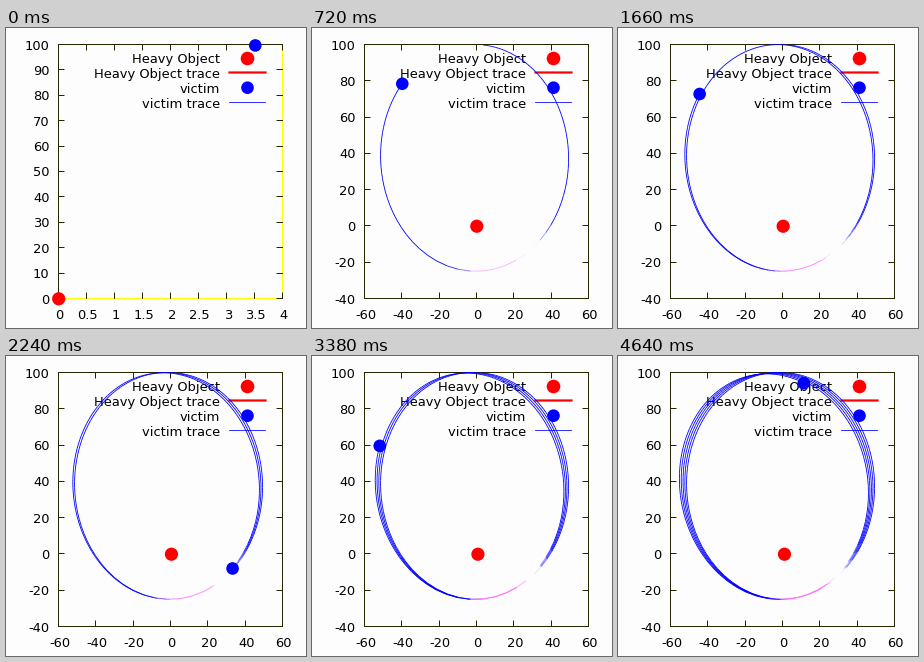
A matplotlib script that plays this animation: 300x300 px, repeating every 4.66 s.

```python
import math

import numpy as np
import matplotlib.pyplot as plt
from matplotlib.animation import FuncAnimation
from matplotlib.collections import LineCollection
from matplotlib.patches import Circle

SIZE, DPI = 300, 100
PX = 72 / DPI                      # one pixel in points
LEFT, RIGHT, TOP, BOTTOM = 52.5, 276.5, 16.5, 270.5
TICK = 5.5
FONT = dict(family="DejaVu Sans", fontsize=13 * PX, va="baseline")
INK = "#262600"

# Slowly turning Kepler ellipse, with the heavy body in one focus
A, ECC, PERIOD = 62.5, 0.6, 58.15
B, FOCUS = A * math.sqrt(1 - ECC ** 2), A * ECC
TILT, TURN = 0.0153, 0.029         # first tilt, extra tilt per orbit
DRIFT = 0.0035                     # heavy body's x speed per step

fig = plt.figure(figsize=(SIZE / DPI, SIZE / DPI), dpi=DPI, facecolor="#fdfdfe")
ax = fig.add_axes([0, 0, 1, 1])


def orbit(step):
    """Victim's x, y and phase (from the far point) at the given steps."""
    mean = 2 * np.pi * (step + 0.5) / PERIOD
    phase = mean - ECC * np.sin(mean)
    for _ in range(20):
        phase = phase - (phase + ECC * np.sin(phase) - mean) / (1 + ECC * np.cos(phase))
    x, y = B * np.sin(phase), FOCUS + A * np.cos(phase)
    lag = np.arctan2(x, y) - phase
    swept = phase + (lag + np.pi) % (2 * np.pi) - np.pi
    tilt = TILT + TURN * swept / (2 * np.pi)
    c, s = np.cos(tilt), np.sin(tilt)
    return x * c - y * s + DRIFT * step, x * s + y * c, phase


def axis_range(lo, hi):
    """Round limits outward to a tidy tick step."""
    span = hi - lo
    power = 10 ** math.floor(math.log10(span))
    room = 20 * power / span
    for limit, unit in ((10, 0.2), (4, 0.5), (1, 1)):
        if room > limit:
            break
    unit *= power
    return math.floor(lo / unit) * unit, math.ceil(hi / unit) * unit, unit


def ticks(lo, hi, unit):
    return [lo + k * unit for k in range(round((hi - lo) / unit) + 1)]


def label(x, y, text, ha):
    ax.text(x, y, text, ha=ha, color="black", zorder=2, **FONT)


def dot(x, y, r, color, z):
    ax.add_patch(Circle((x, y), r, fc=color, ec="none", zorder=z))


def line(xs, ys, color, width=1, z=3):
    """Line on exact pixel centres, without snapping."""
    ax.plot(xs, ys, color=color, lw=width * PX, snap=False, zorder=z,
            solid_capstyle="projecting", solid_joinstyle="miter")


def draw_frame(xr, yr, to_x, to_y, first):
    far = "#ffff00" if first else INK
    line([LEFT, RIGHT, RIGHT], [BOTTOM, BOTTOM, TOP], far, z=1)
    line([LEFT, LEFT, RIGHT], [BOTTOM, TOP, TOP], INK, z=1)
    for v in ticks(*xr):
        x = math.floor(to_x(v)) + 0.5
        line([x, x], [BOTTOM, BOTTOM - TICK], INK, z=1)
        line([x, x], [TOP, TOP + TICK], INK, z=1)
        label(to_x(v) + 1.2, 291, f"{round(v, 6) + 0:g}", "center")
    for v in ticks(*yr):
        y = math.floor(to_y(v)) + 0.5
        line([LEFT, LEFT + TICK], [y, y], INK, z=1)
        line([RIGHT, RIGHT - TICK], [y, y], INK, z=1)
        label(43.6, to_y(v) + 5, f"{round(v, 6) + 0:g}", "right")


def draw_key():
    names = "Heavy Object", "Heavy Object trace", "victim", "victim trace"
    for i, name in enumerate(names):
        label(214, 35.2 + 14.9 * i, name, "right")
    dot(241.5, 30.5, 6.8, "red", 3)
    line([223.5, 259.5], [44.5, 44.5], "red", 2.2)
    dot(241.5, 59.7, 6.3, "blue", 3)
    line([223.5, 259.5], [74.5, 74.5], "blue", 0.8)


def draw_trace(x, y, phase):
    """Blue line that fades out low on the right and is pink at the bottom."""
    deg = np.degrees(phase[:-1]) % 360
    pink = np.interp(deg, [146, 150, 178, 188], [0, 1, 1, 0])
    alpha = np.interp(deg, [122, 138, 148, 154, 178, 200], [1, 0, 0, 0.5, 0.5, 1])
    rgba = np.column_stack([pink, 0.4 * pink, np.ones_like(deg), alpha])
    pts = np.column_stack([x, y])
    segs = np.stack([pts[:-1], pts[1:]], axis=1)
    ax.add_collection(LineCollection(segs, colors=rgba, linewidths=0.85 * PX,
                                     capstyle="butt", snap=False, zorder=4))


def update(slot):
    # Two short pictures, then one held for five slots
    group, rest = divmod(slot + 1, 7)
    n = 3 * group + min(rest, 2) - 1
    step = max(3 * n - 2, n + 1)

    x, y, phase = orbit(np.linspace(1, step, 2 * step + 1))
    xr = axis_range(min(x.min(), DRIFT), x.max())
    yr = axis_range(min(y.min(), 0), y.max())

    def to_x(v):
        return LEFT + (v - xr[0]) / (xr[1] - xr[0]) * (RIGHT - LEFT)

    def to_y(v):
        return BOTTOM - (v - yr[0]) / (yr[1] - yr[0]) * (BOTTOM - TOP)

    ax.clear()
    ax.axis("off")
    ax.set_xlim(0, SIZE)
    ax.set_ylim(SIZE, 0)
    draw_frame(xr, yr, to_x, to_y, n == 0)
    draw_key()
    dot(to_x(DRIFT * step), to_y(0) + 0.3, 6.6, "red", 3)
    draw_trace(to_x(x), to_y(y), phase)
    dot(to_x(x[-1]), to_y(y[-1]) + 0.3, 6.3, "blue", 5)
    return []


anim = FuncAnimation(fig, update, frames=233, interval=20, init_func=lambda: [],
                     repeat=True, repeat_delay=0, blit=False)
plt.show()
```
